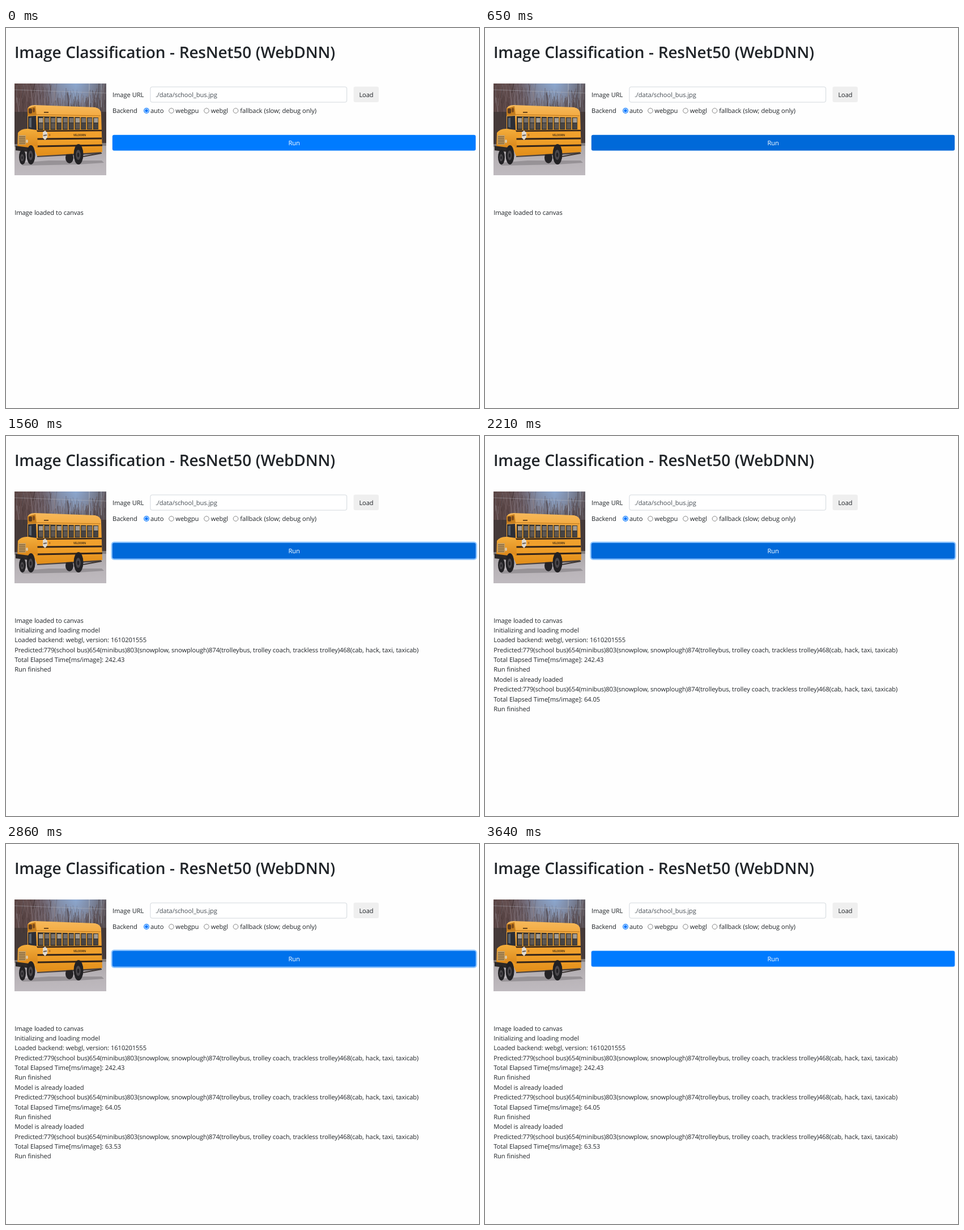
An HTML page with a canvas for the animation above (3.77 s loop, 835x671 px).

```html
<!DOCTYPE html>
<html lang="en">
<head>
<meta charset="utf-8">
<title>Image Classification</title>
<style>
html, body { margin: 0; width: 100%; height: 100%; overflow: hidden; background: #fefefe; }
canvas, svg { position: absolute; left: 0; top: 0; width: 835px; height: 671px; display: block; }
text {
  font: 11.2px "Open Sans", "Noto Sans", sans-serif;
  letter-spacing: -0.11px;
  word-spacing: 0.3px;
  text-rendering: geometricPrecision;
  fill: #212529;
  white-space: pre;
}
.title { font-size: 28px; font-weight: 600; letter-spacing: -0.18px; word-spacing: 0.7px; }
.field { fill: #495057; }
.mid { text-anchor: middle; }
.run { fill: #fff; }
</style>
</head>
<body>
<canvas id="stage" width="835" height="671"></canvas>
<svg id="words" viewBox="0 0 835 671">
  <text class="title" x="15" y="53">Image Classification - ResNet50 (WebDNN)</text>
  <text x="188" y="122">Image URL</text>
  <text class="field" x="264" y="122">./data/school_bus.jpg</text>
  <text class="mid" x="636" y="122">Load</text>
  <text x="188" y="150">Backend</text>
  <text x="255" y="150">auto</text>
  <text x="299.3" y="150">webgpu</text>
  <text x="361.7" y="150">webgl</text>
  <text x="413.3" y="150">fallback (slow; debug only)</text>
  <text class="mid run" x="508.7" y="207">Run</text>
</svg>
<script>
const LOOP = 3770;
const ctx = document.getElementById('stage').getContext('2d');
const words = document.getElementById('words');

const predicted = 'Predicted:779(school bus)654(minibus)803(snowplow, snowplough)' +
  '874(trolleybus, trolley coach, trackless trolley)468(cab, hack, taxi, taxicab)';
const result = ms => [predicted, `Total Elapsed Time[ms/image]: ${ms}`, 'Run finished'];
const log = [
  'Image loaded to canvas',
  'Initializing and loading model',
  'Loaded backend: webgl, version: 1610201555',
  ...result('242.43'),
  'Model is already loaded', ...result('64.05'),
  'Model is already loaded', ...result('63.53')
];

const logRows = log.map((line, i) => {
  const row = document.createElementNS(words.namespaceURI, 'text');
  row.setAttribute('x', 15.2);
  row.setAttribute('y', 329.5 + i * 17.38);
  row.textContent = line;
  words.append(row);
  return row;
});

// start time, button colour, focus ring width, visible log lines
const states = [
  [0, '#007bff', 0, 1],
  [520, '#0073ec', 0, 1],
  [650, '#0069d9', 0, 1],
  [780, '#0064cf', 1.2, 1],
  [910, '#0069d9', 2.3, 2],
  [1560, '#0069d9', 2.3, 6],
  [2210, '#0069d9', 2.3, 10],
  [2470, '#0069d9', 2.3, 14],
  [2860, '#0072ec', 2.3, 14],
  [2990, '#007bff', 2.3, 14],
  [3640, '#007bff', 1, 14]
];

function box(x, y, w, h, r, fill, line) {
  ctx.beginPath();
  ctx.roundRect(x, y, w, h, r);
  if (fill) { ctx.fillStyle = fill; ctx.fill(); }
  if (line) { ctx.strokeStyle = line; ctx.lineWidth = 1; ctx.stroke(); }
}

function poly(fill, ...pts) {
  ctx.beginPath();
  for (let i = 0; i < pts.length; i += 2) ctx.lineTo(pts[i], pts[i + 1]);
  ctx.closePath();
  ctx.fillStyle = fill;
  ctx.fill();
}

function oval(x, y, rx, ry, fill) {
  ctx.beginPath();
  ctx.ellipse(x, y, rx, ry, 0, 0, 7);
  ctx.fillStyle = fill;
  ctx.fill();
}

function stroke(color, width, x1, y1, x2, y2) {
  ctx.strokeStyle = color;
  ctx.lineWidth = width;
  ctx.beginPath();
  ctx.moveTo(x1, y1);
  ctx.lineTo(x2, y2);
  ctx.stroke();
}

function blend(x0, y0, x1, y1, ...colors) {
  const g = ctx.createLinearGradient(x0, y0, x1, y1);
  colors.forEach((c, i) => g.addColorStop(i / (colors.length - 1), c));
  return g;
}
const fade = (y0, y1, ...colors) => blend(0, y0, 0, y1, ...colors);

function radio(x, on) {
  ctx.beginPath();
  ctx.arc(x, 146, 4.3, 0, 7);
  ctx.fillStyle = '#fff';
  ctx.fill();
  ctx.strokeStyle = on ? '#0075ff' : '#767676';
  ctx.lineWidth = on ? 1.2 : 0.9;
  ctx.stroke();
  if (on) oval(x, 146, 2.7, 2.7, '#0075ff');
}

function drawTrees() {
  let seed = 7;
  const rnd = () => (seed = seed * 16807 % 2147483647) / 2147483647;
  box(0, 0, 162, 115, 0, fade(0, 60, '#8ba7cf', '#8795b0', '#5f5658'));
  box(0, 0, 162, 115, 0, blend(0, 0, 162, 0,
    '#5e4847', '#644f50', '#6b5a60d0', '#77707c60', '#77708000', '#6a626a70', '#544a4cd0'));
  box(0, 50, 162, 65, 0, '#453a39');
  const tones = ['#382b2b', '#574140', '#8d8289', '#483737'];
  for (let i = 0; i < 260; i++) {
    const x = rnd() * 162;
    const open = x > 72 && x < 145;
    const top = open ? 8 + rnd() * 32 : rnd() * 42 - 6;
    ctx.globalAlpha = 0.25 + rnd() * 0.4;
    stroke(tones[i % 4], 0.4 + rnd() * 0.8, x + rnd() * 10 - 5, top, x, top + 12 + rnd() * 30);
  }
  ctx.globalAlpha = 0.6;
  stroke('#b9bcc6', 0.7, 0, 11, 162, 17);
  [132, 153].forEach(x => stroke('#c9ccd4', 1, x, 0, x, 42));
  ctx.globalAlpha = 1;
}

function drawBus() {
  poly('#77727680', 10, 140, 60, 136, 154, 136, 158, 140, 112, 143, 14, 145);
  poly('#4b4341', 40, 120, 154, 117, 152, 124, 40, 130);
  oval(97, 131, 7, 10, '#252326');

  // body with a rounded roof
  ctx.beginPath();
  ctx.moveTo(23, 46);
  ctx.quadraticCurveTo(24, 38, 36, 38);
  ctx.lineTo(142, 42);
  ctx.quadraticCurveTo(153, 44, 153, 54);
  ctx.lineTo(155, 121);
  ctx.lineTo(40, 128);
  ctx.lineTo(23, 90);
  ctx.fillStyle = fade(38, 130, '#f6b95b', '#f2a233', '#f0a02a', '#e08c18');
  ctx.fill();
  stroke('#b9741a', 1, 39, 55, 152, 57);
  poly('#c47c1e', 23, 44, 37, 40, 39, 56, 23, 57);
  box(25, 44, 6, 9, 2, '#593a20');
  box(32, 43, 4, 8, 2, '#7d4b1b');
  box(52, 50, 8, 1.8, 0, '#5b3b17');

  // windscreen and side windows
  poly('#2b2e36', 24, 58, 38, 57, 39, 82, 24, 80);
  poly('#59626c', 26, 61, 30, 60, 30, 78, 26, 77);
  poly('#30302f', 41, 58, 149, 60, 149, 81, 41, 82);
  for (let i = 0; i < 10; i++) {
    const x = 42 + i * 10.8;
    box(x + 1, 61, 7.2, 8, 0, i % 3 ? '#77716d' : '#a49c92');
    box(x + 1, 70, 7.2, 10, 0, i % 2 ? '#474444' : '#5d5651');
    stroke('#e29a31', 1.8, x + 9.6, 59, x + 9.6, 82);
  }
  stroke('#33241a', 2.6, 39, 84, 154, 83);
  stroke('#33241a', 3.2, 39, 98, 154, 97);
  stroke('#33241a', 3.2, 39, 111, 155, 109);

  // bonnet, grille and bumper
  ctx.beginPath();
  ctx.moveTo(6, 87);
  ctx.quadraticCurveTo(12, 79, 24, 80);
  ctx.lineTo(40, 84);
  ctx.lineTo(41, 113);
  ctx.lineTo(34, 110);
  ctx.lineTo(23, 116);
  ctx.lineTo(5, 114);
  ctx.fillStyle = fade(80, 115, '#f4ae3c', '#da8619');
  ctx.fill();
  box(7, 91, 13, 17, 1, '#c9a265');
  for (let y = 94; y < 108; y += 3) stroke('#6e5330', 1.2, 8, y, 19, y);
  oval(22, 102, 1.8, 3, '#d9cbb0');
  poly('#2c2827', 2, 110, 25, 113, 25, 121, 2, 118);

  // side sign and lettering
  poly('#dfd9d0', 50, 86, 54, 83, 58, 87, 58, 95, 54, 100, 50, 96);
  stroke('#6a5d55', 2, 51, 92, 57, 91);
  oval(62, 91, 1.5, 2, '#b87021');
  ctx.fillStyle = '#4b3215';
  ctx.font = 'bold 4.6px "Open Sans", sans-serif';
  ctx.fillText('VELDORN', 104, 93);

  // wheels
  [[14, 130, 6, 13], [29, 126, 7.5, 17], [113, 125, 8.5, 18]].forEach(([x, y, rx, ry]) => {
    oval(x, y, rx, ry, '#222124');
    oval(x - 0.5, y + 1, rx * 0.5, ry * 0.5, '#4b484c');
    oval(x - 0.5, y + 1, rx * 0.22, ry * 0.22, '#232226');
  });
  stroke('#3b3432', 2, 121, 129, 154, 123);
}

function drawPhoto() {
  ctx.save();
  ctx.translate(15, 98);
  ctx.beginPath();
  ctx.rect(0, 0, 162, 162);
  ctx.clip();
  drawTrees();
  box(0, 108, 162, 54, 0, fade(108, 162, '#aaa5a7', '#b8b3b7', '#bfbabf'));
  poly('#847d7b', 0, 107, 162, 105, 162, 110, 0, 112);
  drawBus();
  ctx.restore();
}

function drawPage() {
  ctx.fillStyle = '#fefefe';
  ctx.fillRect(0, 0, 835, 671);
  drawPhoto();
  box(254.9, 104, 346.8, 27, 3, '#fff', '#d3d8dd');
  box(613.6, 103.6, 44.4, 27.4, 3, '#efefef');
  [248, 292, 354, 405.5].forEach((x, i) => radio(x, i === 0));
}

function drawButton(color, ring) {
  const [x, y, w, h] = [187.8, 188.8, 641.4, 27.8];
  ctx.fillStyle = '#fefefe';
  ctx.fillRect(183, 184, 652, 38);
  if (ring) {
    box(x - ring, y - ring, w + 2 * ring, h + 2 * ring, 3 + ring,
      `rgba(38,143,255,${0.5 * ring / 2.3})`);
  }
  box(x, y, w, h, 3, color);
}

function frame() {
  const t = performance.now() % LOOP;
  const [, color, ring, count] = states.findLast(s => s[0] <= t);
  drawButton(color, ring);
  logRows.forEach((row, i) => { row.style.display = i < count ? '' : 'none'; });
  requestAnimationFrame(frame);
}

drawPage();
frame();
</script>
</body>
</html>
```
